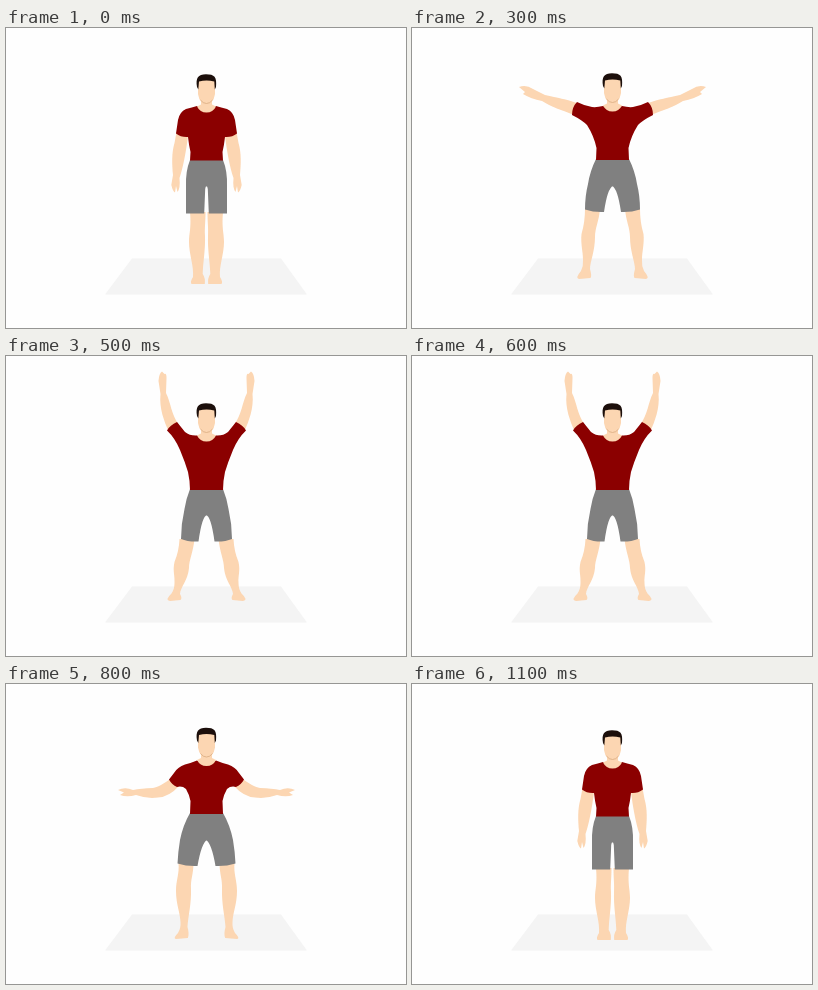
An HTML page that plays this animation: 400 px wide and 300 px high, repeating every 1200 ms.

```html
<!DOCTYPE html>
<html lang="en">
<head>
<meta charset="utf-8">
<title>Jumping jack</title>
<style>
  html, body { margin: 0; width: 100%; height: 100%; overflow: hidden; background: #fefefe; }
  svg { display: block; width: 100vw; height: 100vh; }
  .skin { fill: #fcd6b2; }
  .shirt { fill: #8b0000; }
  .shorts { fill: #808080; }
  .hair { fill: #1c0f0b; }
  .jaw { fill: none; stroke: #d9ab80; stroke-width: .8; }
  .pose { visibility: hidden; animation: 1.2s step-end infinite; }
  #stand { animation-name: stand; }
  #dip { animation-name: dip; }
  #wide { animation-name: wide; }
  #rise { animation-name: rise; }
  #top { animation-name: top; }
  @keyframes stand {
    0%, 91.667% { visibility: visible; }
    8.333% { visibility: hidden; }
  }
  @keyframes dip {
    0%, 16.667%, 91.667% { visibility: hidden; }
    8.333%, 75% { visibility: visible; }
  }
  @keyframes wide {
    0%, 25%, 75% { visibility: hidden; }
    16.667%, 66.667% { visibility: visible; }
  }
  @keyframes rise {
    0%, 33.333%, 66.667% { visibility: hidden; }
    25%, 58.333% { visibility: visible; }
  }
  @keyframes top {
    0%, 58.333% { visibility: hidden; }
    33.333% { visibility: visible; }
  }
</style>
</head>
<body>
<svg viewBox="0 0 400 300">
  <defs>
    <g id="head">
      <path class="skin" d="M195 70V76.500L191 78.500Q194 84.500 200.500 84.500Q207 84.500 210 78.500L206 76.500V70Z"/>
      <path class="skin" d="M192 52H209V66Q208.500 71 205 75Q200.500 77.500 196 75Q192.500 71 192 66Z"/>
      <path class="jaw" d="M194.500 72Q197 75.500 200.500 75.500Q204 75.500 206.500 72"/>
      <path class="hair" d="M192.300 61.500L191 59C189.500 50 192 46.300 200 46.300C208.500 46.300 211 49 210 59L208.800 61.500L208.300 53.500Q200.500 51.500 193 53.500Z"/>
    </g>
  </defs>
  <path fill="#f4f4f4" d="M126 230.500H275L301 266.500H99Z"/>
</svg>
<script>
  // Each pose is the left half of the body; the right half mirrors it.
  const poses = {
    stand: {
      head: 0,
      leg: 'M184 184H199.500C199.500 195 198.500 200 199 208C199.500 222 197 234 196.700 246Q199.500 250 198.800 256L185.500 256Q183.800 254 187 249C188 238 183 226 183 214C183 205 185.500 200 184 184Z',
      shorts: 'M184 132H201V158Q199.400 158 199.200 161L198.200 185.500H180V158Q179.500 143 184 132Z',
      arm: 'M170.500 104L168.500 115C165.500 125 166 136 167 147L165.300 157Q167 164 169 164.500L170 158L171.500 164Q174.500 160 173.500 150C177 140 180 124 182 108Z',
      shirt: 'M201 83L191 78Q186 79.500 180 81Q173.500 84 172 92L170 105.500Q175 109.500 182 109Q183 118 184.500 124L184 132.500H201Z'
    },
    dip: {
      head: 4,
      leg: 'M180 187H198C197.500 200 197 205 197.500 214C198 228 196 238 196.500 247Q199.500 251 198.500 256.500L186 257Q183.500 256 187 250C187.500 238 181.500 226 181.500 212Q182 198 180 187Z',
      shorts: 'M184 135H201V162Q198 161 197.500 165L197 188.500H176Q175 170 177 157Q178 144 184 135Z',
      arm: 'M170 107L168.500 117C161 127 159 137 157.500 146Q154 151 155.500 156L159.500 164Q163 166 161.500 159L164 157Q164.500 152 163 147C170 139 177 128 182 110Z',
      shirt: 'M201 87L191 82Q186 83 180 84.500Q174 87 172 95L168.500 109.500Q175 113 181.500 111Q182.500 120 184.500 126L184 136H201Z'
    },
    wide: {
      head: -2.5,
      leg: 'M172.500 179H187.500C187.500 190 184.500 195 185 205C185.500 220 182 233 181.500 243Q183.500 250 181.800 254L170 255Q166.500 254.500 172 249Q175 244 174.500 238C174 228 170 220 170 207C170 196 173.500 190 172.500 179Z',
      shorts: 'M184 129H201V156Q195.500 159 191.500 182Q181 182.500 171.500 179.500Q172 168 174 156Q177 141 184 129Z',
      arm: 'M168 92C160 98 155 102 147 104Q135 104.500 127 106Q119 102.500 112 106L118 108.500L114 111Q121 113.500 130 111Q141 115 152 113.500Q163 113 173 102Z',
      shirt: 'M201 81L191 76.500Q185 79 179 80.500Q171.500 83 168 89L163 95.500Q166 101 171 103Q176 101.500 180 105Q183 110 184.500 117L184 130H201Z'
    },
    rise: {
      head: -1,
      leg: 'M173 181H188C187 193 183 200 183 209C183 223 178 234 178 241Q180 248 178.500 250L167 251Q163 250 169 243Q171.500 238 171 232C171 223 168.500 216 169.500 206Q173 194 173 181Z',
      shorts: 'M184 131H201V158Q195.500 160 192 184Q182 184.500 173 181.500Q173 168 176 156Q178 143 184 131Z',
      arm: 'M165 75C154 71 146 70 133 67L121 61Q114 56 107 59L113 64L111 66Q119 71 130 73C139 79 150 82 162 87Z',
      shirt: 'M201 82L191 78Q185 79.500 180 79Q173 78 165 74Q160 79 160 87Q170 92 175 97Q182 108 184.500 120L184 132H201Z'
    },
    top: {
      head: 1,
      leg: 'M173.500 183H188.500C187 197 183 204 183 212C182 224 174.500 231 174 238Q176.500 242 174.500 244L164 245Q158.500 244 165.500 237.500Q168.500 233 168.500 227C169 219 166.500 215 168.500 206Q173 195 173.500 183Z',
      shorts: 'M184 133H201V159Q196 160 192.500 185.500Q182 186 175 183Q175 168 178.500 153Q180 143 184 133Z',
      arm: 'M163 76C158 65 153 52 154.500 38L152.500 25Q153 17 156 15.500L158.500 18Q160.500 17 160.500 22L160 37C165 47 165 58 173 69Z',
      shirt: 'M201 84L191 79.500Q184 80 179 76L171 66Q164 69 161 74.500Q169 82 174 94Q179 106 182 116Q184 125 184 134H201Z'
    }
  };
  const parts = { leg: 'skin', shorts: 'shorts', arm: 'skin', shirt: 'shirt' };
  const draw = ([id, p]) => {
    const half = Object.entries(parts)
      .map(([part, cls]) => `<path class="${cls}" d="${p[part]}"/>`).join('');
    return `<g class="pose" id="${id}"><g>${half}</g>` +
      `<g transform="matrix(-1 0 0 1 401 0)">${half}</g>` +
      `<use href="#head" y="${p.head}"/></g>`;
  };
  document.querySelector('svg').insertAdjacentHTML('beforeend',
    Object.entries(poses).map(draw).join(''));
</script>
</body>
</html>
```
